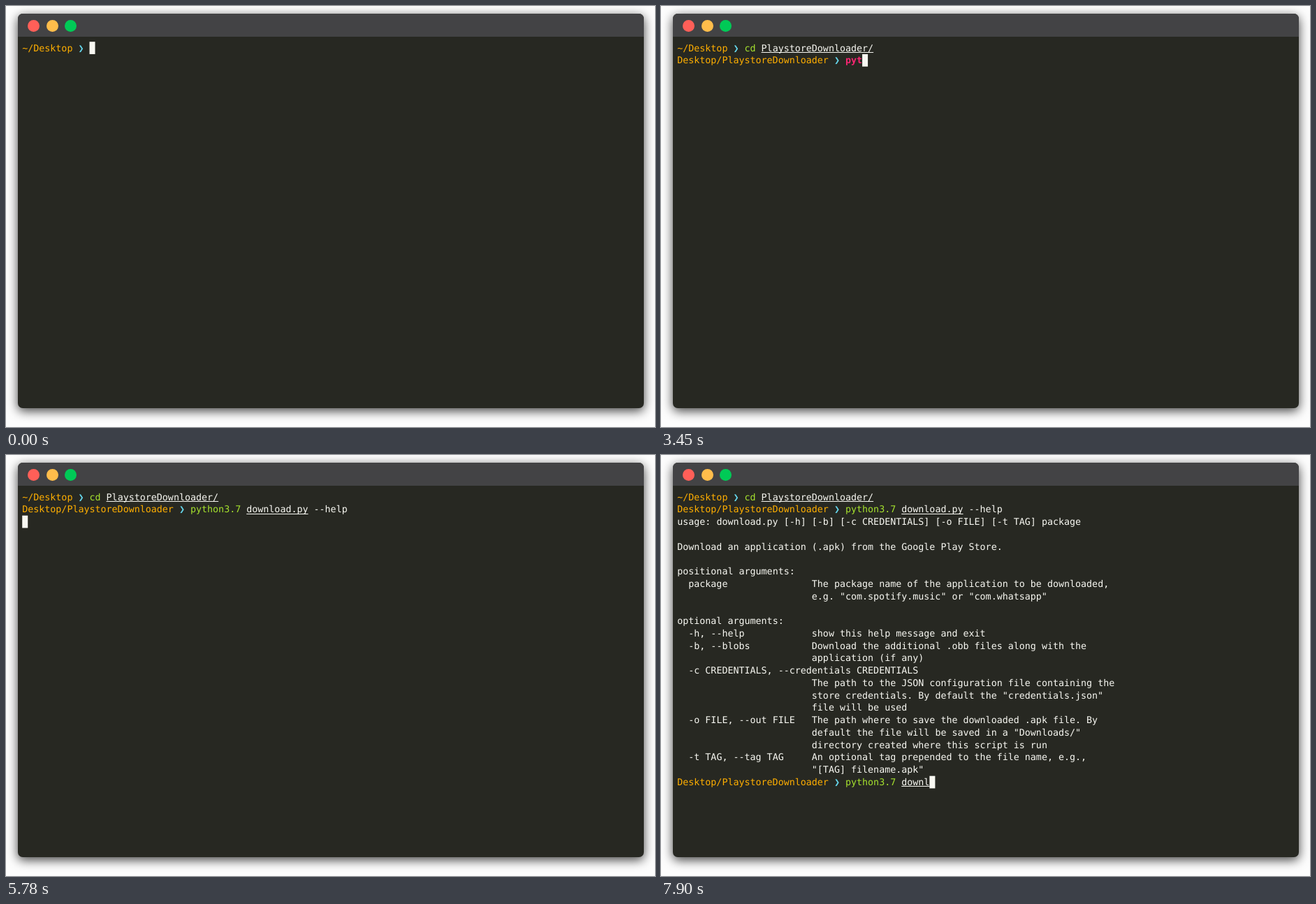
Animation of 929 by 603 pixels, one loop 8 s. Source, as an HTML page with a canvas:

```html
<!DOCTYPE html>
<html lang="en">
<head>
<meta charset="utf-8">
<title>Terminal session</title>
<style>
  html, body { margin: 0; width: 100%; height: 100%; overflow: hidden; background: #fdfdfd; }
  .window {
    position: absolute; left: 16.5px; top: 11px; width: 896px; height: 564.5px;
    border-radius: 7px; background: #272822; box-shadow: 0 4px 15px rgba(0, 0, 0, .75);
  }
  .bar { height: 33px; border-radius: 7px 7px 0 0; background: #434345; }
  .bar i { position: absolute; top: 8.5px; width: 17px; height: 17px; border-radius: 50%; }
  canvas { position: absolute; left: 0; top: 0; }
</style>
</head>
<body>
<div class="window">
  <div class="bar">
    <i style="left:14.5px;background:#ff5f58"></i>
    <i style="left:41px;background:#ffbd4b"></i>
    <i style="left:67.8px;background:#00ca56"></i>
  </div>
</div>
<canvas id="screen" width="929" height="603"></canvas>
<script>
const DURATION = 8000;
const LEFT = 23.2, TOP = 51.2, COL = 8.026, ROW = 17.76, BASELINE = 13.3;
const WHITE = '#f8f8f2', ORANGE = '#ffaf00', CYAN = '#66d9ef', GREEN = '#a6e22e', RED = '#f92672';
const FONT = '13.33px "DejaVu Sans Mono", monospace';
const KNOWN_COMMANDS = ['cd', 'python', 'python3', 'python3.7'];

const HELP = `usage: download.py [-h] [-b] [-c CREDENTIALS] [-o FILE] [-t TAG] package

Download an application (.apk) from the Google Play Store.

positional arguments:
  package               The package name of the application to be downloaded,
                        e.g. "com.spotify.music" or "com.whatsapp"

optional arguments:
  -h, --help            show this help message and exit
  -b, --blobs           Download the additional .obb files along with the
                        application (if any)
  -c CREDENTIALS, --credentials CREDENTIALS
                        The path to the JSON configuration file containing the
                        store credentials. By default the "credentials.json"
                        file will be used
  -o FILE, --out FILE   The path where to save the downloaded .apk file. By
                        default the file will be saved in a "Downloads/"
                        directory created where this script is run
  -t TAG, --tag TAG     An optional tag prepended to the file name, e.g.,
                        "[TAG] filename.apk"`.split('\n');

// Each burst of typing: start ms, end ms, characters at start, characters at end.
const PROMPTS = [
  { at: 0, row: 0, path: '~/Desktop', command: 'cd PlaystoreDownloader/',
    bursts: [[860, 1560, 1, 8], [1620, 1620, 9, 9], [1680, 2360, 10, 20], [2490, 2610, 21, 23]] },
  { at: 3140, row: 1, path: 'Desktop/PlaystoreDownloader', command: 'python3.7 download.py --help',
    bursts: [[3200, 3260, 1, 2], [3450, 3450, 3, 3], [3510, 4190, 4, 16], [4320, 4630, 17, 21], [4760, 5120, 22, 28]] },
  { at: 6040, row: 23, path: 'Desktop/PlaystoreDownloader', command: 'python3.7 download.py',
    bursts: [[6830, 7280, 1, 6], [7340, 7590, 7, 10], [7650, 7900, 11, 15]] },
];
const RUN_AT = 5780, OUTPUT_AT = 6040, OUTPUT_ROW = 2;

const ctx = document.getElementById('screen').getContext('2d');
ctx.textRendering = 'geometricPrecision';

const xOf = col => LEFT + col * COL;
const yOf = row => TOP + row * ROW;

function print(text, col, row, color = WHITE, { bold = false, underline = false } = {}) {
  ctx.fillStyle = color;
  ctx.font = (bold ? 'bold ' : '') + FONT;
  for (const word of text.matchAll(/\S+/g)) {
    ctx.fillText(word[0], xOf(col + word.index), yOf(row) + BASELINE);
  }
  if (underline) ctx.fillRect(xOf(col), Math.round(yOf(row) + 14.8), text.length * COL, 1);
}

function typedCount(bursts, t) {
  const burst = bursts.findLast(([start]) => t >= start);
  if (!burst) return 0;
  const [start, end, from, to] = burst;
  const progress = t >= end ? 1 : (t - start) / (end - start);
  return Math.floor(from + (to - from) * progress + 1e-6);
}

// Prints a prompt with its highlighted command and returns the cursor cell.
function drawPrompt({ row, path, command, bursts }, t) {
  print(path, 0, row, ORANGE);
  print('❯', path.length + 1, row, CYAN, { bold: true });
  const start = path.length + 3;
  const typed = command.slice(0, typedCount(bursts, t));
  for (const { 0: word, index } of typed.matchAll(/\S+/g)) {
    if (index === 0) {
      const known = KNOWN_COMMANDS.includes(word);
      print(word, start, row, known ? GREEN : RED, { bold: !known });
    } else {
      print(word, start + index, row, WHITE, { underline: !word.startsWith('-') });
    }
  }
  return [start + typed.length, row];
}

function draw(t) {
  ctx.clearRect(0, 0, 929, 603);
  let cursor;
  for (const prompt of PROMPTS) if (t >= prompt.at) cursor = drawPrompt(prompt, t);
  if (t >= OUTPUT_AT) HELP.forEach((line, i) => print(line, 0, OUTPUT_ROW + i));
  else if (t >= RUN_AT) cursor = [0, OUTPUT_ROW];
  ctx.fillStyle = WHITE;
  ctx.fillRect(xOf(cursor[0]), yOf(cursor[1]), COL, ROW);
}

const startTime = performance.now();
function tick() {
  draw((performance.now() - startTime) % DURATION);
  requestAnimationFrame(tick);
}
tick();
</script>
</body>
</html>
```
